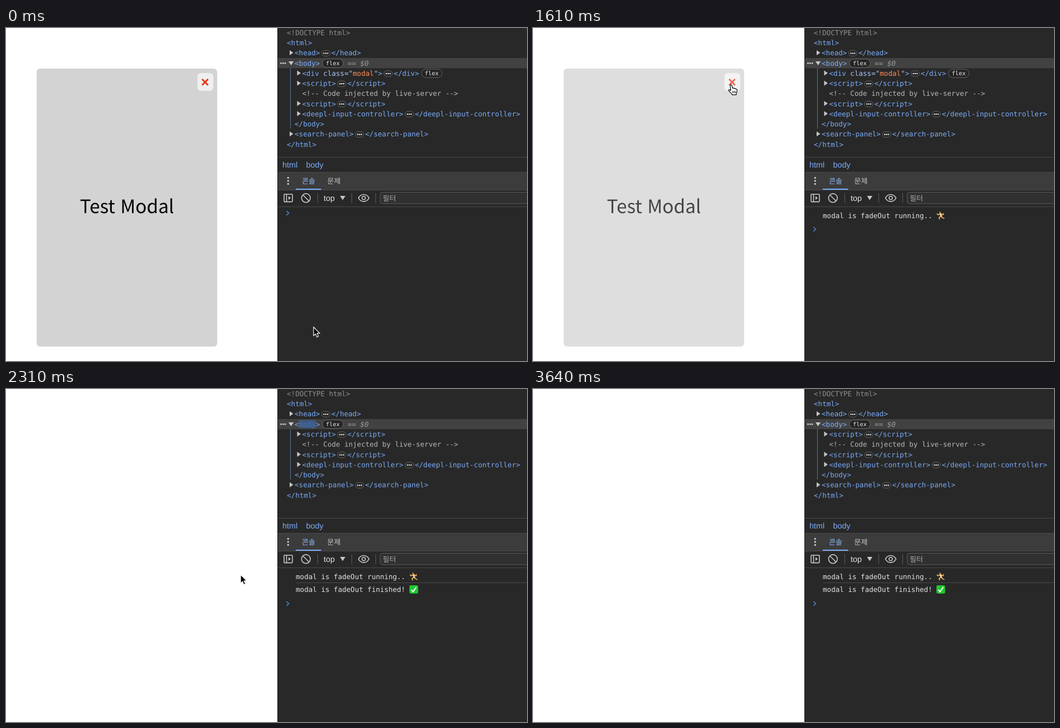
Animation, 935 px wide and 599 px high, one loop 4060 ms. Source, as an HTML page:

```html
<!DOCTYPE html>
<html lang="ko">
<head>
<meta charset="utf-8">
<title>Modal fade out</title>
<style>
  html, body { margin: 0; width: 100%; height: 100%; overflow: hidden; background: #fff; }
  svg { display: block; width: 935px; height: 599px; }
  text { white-space: pre; text-rendering: geometricPrecision; }
  .code text { font: 12.57px "DejaVu Sans Mono", monospace; fill: #7cacf8; }
  .ui { font: 14.4px "Liberation Sans", Arial, sans-serif; fill: #7cacf8; }
  .ko { font: 13px "Noto Sans CJK KR", "Noto Sans CJK", sans-serif; fill: #c7c7c7; }
  .title { font: 33.4px "Noto Sans CJK KR", "Noto Sans CJK", sans-serif; text-anchor: middle; }
  .code .badge { font-size: 10.3px; fill: #e8eaed; text-anchor: middle; }
  .code .attr { fill: #a8c7fa; }
  .code .value { fill: #fe8d59; }
  .code .note { fill: #b9b9b9; }
  .code .type { fill: #8f8f8f; }
  .code .ref { fill: #9a9a9a; font-style: italic; }
  .code .log { fill: #e3e3e3; }
  .line { stroke: #4a4a4a; }
  .icon { fill: none; stroke: #c7c7c7; stroke-width: 1.6; }

  .anim { animation: 4060ms step-end infinite; }
  #modal { animation-name: fade; }
  #cursor { animation-name: move; }
  #arrow { animation-name: arrow; }
  #hand { animation-name: hand; }
  #ring { animation-name: ring; }
  #running { animation-name: running; }
  #finished, #guideShort { animation-name: finished; }
  #divRow, #guideLong { animation-name: removed; }
  #after { animation-name: shift; }
  #prompt { animation-name: prompt; }
  #flash { animation-name: flash; }

  @keyframes fade {
    0% { opacity: 1; }
    36.2% { opacity: 1; animation-timing-function: ease; }
    54.67%, 100% { opacity: 0; }
  }
  @keyframes move {
    0% { transform: translate(551px, 537px); animation-timing-function: steps(2); }
    3.44% { transform: translate(532px, 506px); animation-timing-function: steps(3); }
    8.62% { transform: translate(445px, 352px); animation-timing-function: steps(3); }
    13.79% { transform: translate(387px, 240px); animation-timing-function: steps(2); }
    17.24% { transform: translate(352px, 167px); animation-timing-function: steps(2); }
    20.68% { transform: translate(347px, 122px); animation-timing-function: steps(2); }
    24.13%, 36.2% { transform: translate(346px, 95px); animation-timing-function: steps(5); }
    44.82% { transform: translate(356px, 110px); animation-timing-function: steps(3); }
    50% { transform: translate(384px, 200px); animation-timing-function: steps(2); }
    53.44% { transform: translate(408px, 286px); animation-timing-function: steps(2); }
    56.89% { transform: translate(420px, 333px); animation-timing-function: steps(3); }
    62.06% { transform: translate(429px, 412px); animation-timing-function: steps(2); }
    65.51%, 75.86% { transform: translate(431px, 434px); animation-timing-function: steps(8); }
    89.65%, 100% { transform: translate(462px, 610px); }
  }
  @keyframes arrow { 0%, 46.55%, 100% { opacity: 1; } 22.41% { opacity: 0; } }
  @keyframes hand { 0%, 46.55%, 100% { opacity: 0; } 22.41% { opacity: 1; } }
  @keyframes ring { 0%, 36.2%, 100% { opacity: 0; } 32.75% { opacity: 1; } }
  @keyframes running { 0% { opacity: 0; } 36.2%, 100% { opacity: 1; } }
  @keyframes finished { 0% { opacity: 0; } 55.17%, 100% { opacity: 1; } }
  @keyframes removed { 0% { opacity: 1; } 55.17%, 100% { opacity: 0; } }
  @keyframes shift { 0% { transform: none; } 55.17%, 100% { transform: translateY(-18.25px); } }
  @keyframes prompt {
    0% { transform: none; }
    36.2% { transform: translateY(29px); }
    55.17%, 100% { transform: translateY(53px); }
  }
  @keyframes flash {
    0% { opacity: 0; }
    55.17% { opacity: .95; animation-timing-function: linear; }
    58.62% { opacity: .7; animation-timing-function: ease-out; }
    65.51%, 100% { opacity: 0; }
  }
</style>
</head>
<body>
<svg viewBox="0 0 935 599">
  <g id="modal" class="anim">
    <rect x="55" y="73" width="324" height="500" rx="6" fill="#d3d3d3"/>
    <rect x="343.5" y="81" width="28.5" height="32" rx="6" fill="#efefef"/>
    <path d="M352 92l10.6 10.8m0-10.8L352 102.800" stroke="#e5330d" stroke-width="2.8"/>
    <text class="title" x="217" y="333">Test Modal</text>
  </g>

  <rect x="488" width="447" height="599" fill="#282828"/>
  <path d="M487.500 0V599" stroke="#1c1c1c"/>
  <rect x="488" y="54" width="447" height="18.300" fill="#424242"/>
  <path id="guideLong" class="anim" d="M510.500 72V181" stroke="#5b769f"/>
  <path id="guideShort" class="anim" d="M510.500 72V163" stroke="#5b769f"/>

  <g id="tree" class="code">
    <g id="divRow" class="anim"></g>
    <g id="after" class="anim"></g>
  </g>
  <g fill="#c7c7c7">
    <circle cx="493.500" cy="63.300" r="1.500"/>
    <circle cx="497.300" cy="63.300" r="1.500"/>
    <circle cx="501.100" cy="63.300" r="1.500"/>
    <path d="M507 60h9.200l-4.600 7z"/>
  </g>
  <rect id="flash" class="anim" x="525.500" y="56" width="30.500" height="14.500" rx="2" fill="#3d5f92"/>

  <path class="line" d="M488 232.500H935"/>
  <text class="ui" x="496" y="251">html</text>
  <text class="ui" x="538.500" y="251">body</text>

  <rect x="488" y="260" width="447" height="31" fill="#3c3c3c"/>
  <path class="line" d="M488 259.500H935M488 291.500H935M488 321.500H935"/>
  <g fill="#c7c7c7">
    <circle cx="506.300" cy="269.500" r="1.700"/>
    <circle cx="506.300" cy="275" r="1.700"/>
    <circle cx="506.300" cy="280.500" r="1.700"/>
  </g>
  <text class="ko" x="531" y="279.500" style="fill:#8fb8f8">콘솔</text>
  <text class="ko" x="576.500" y="279.500">문제</text>
  <rect x="520" y="289" width="45.500" height="2" fill="#7cacf8"/>

  <g class="icon">
    <rect x="499" y="299" width="15" height="13.600" rx="1"/>
    <path d="M503.500 299v13.600"/>
    <path d="M507 302.500l4 3.300-4 3.300z" fill="#c7c7c7" stroke="none"/>
    <circle cx="538.300" cy="305.800" r="7.900"/>
    <path d="M532.800 300.300l11 11"/>
    <path d="M632.500 305.800Q636 299.500 642 299.500T651.500 305.800Q648 312.100 642 312.100T632.500 305.800z"/>
    <circle cx="642" cy="305.800" r="3"/>
  </g>
  <path d="M559.500 297v18M620.500 297v18M663.500 297v18" stroke="#5a5a5a"/>
  <text class="ui" x="570" y="310.800" style="fill:#e3e3e3">top</text>
  <path d="M599.500 302h9.500l-4.750 7.500z" fill="#c7c7c7"/>
  <rect x="671.500" y="295.500" width="280" height="20.500" rx="4" fill="#303030" stroke="#5c5c5c"/>
  <text class="ko" x="676" y="310.500" style="fill:#a8a8a8">필터</text>

  <g id="running" class="anim code">
    <text class="log" x="520" y="341.500">modal is fadeOut running..</text>
    <g fill="none" stroke-linecap="round" stroke-linejoin="round" stroke-width="1.900">
      <path d="M732 339l-3 1.500.5 3M733 338.500l1.500 2.500 3 1.500M730 334.500l-3 1.500-1.500-1.500M732.500 334.500l3 1.500 1-2" stroke="#eeb04c"/>
      <path d="M731.300 334.300l1 3.700" stroke="#f3dfb4" stroke-width="3"/>
      <circle cx="730.300" cy="331.800" r="1.300" fill="#f0bd5e" stroke="#8a5a2c" stroke-width=".8"/>
    </g>
  </g>
  <g id="finished" class="anim code">
    <path class="line" d="M520 348.500H935"/>
    <text class="log" x="520" y="365">modal is fadeOut finished!</text>
    <rect x="724" y="353" width="15.600" height="15" rx="3" fill="#1fc52f"/>
    <path d="M727.500 361l3 3.800 5.800-8.600" fill="none" stroke="#fff" stroke-width="2"/>
  </g>
  <path id="prompt" class="anim" d="M503.200 329l4.300 4-4.300 4" fill="none" stroke="#5287d8" stroke-width="1.500"/>

  <g id="ring" class="anim" fill="none">
    <circle cx="346.500" cy="93" r="33.300" stroke="#fff" stroke-width="4"/>
    <circle cx="346.500" cy="93" r="33.300" stroke="#000" stroke-width="2"/>
  </g>
  <g id="cursor" class="anim">
    <path id="arrow" class="anim" d="M1 1V16.500L4.500 13.300L7 19L9.700 17.800L7.300 12.200H12z" stroke="#fff" stroke-width="1.200"/>
    <g id="hand" class="anim" fill="#fff" stroke="#000" stroke-width="1.200" stroke-linejoin="round">
      <path d="M4.800 11.500L3.900 3.200Q3.900 1.200 5.400 1.200T7.200 3L7.900 7.200Q9.600 6.200 10.800 7.800Q12.500 7 13.500 8.600Q15.900 8.200 16.300 10.600Q16.500 13 15 15.800L14.700 19.200H7.300L6.800 17.400Q3.600 14.800 1.100 11.700Q.6 9.500 2.800 10z"/>
      <path d="M8.600 12.200v3.800M10.900 12.200v3.800M13.200 12.200v3.800" fill="none" stroke-width="1"/>
    </g>
  </g>
</svg>
<script>
  const NS = "http://www.w3.org/2000/svg";
  const CHAR = 7.567;
  const [tree, divRow, after] = ["tree", "divRow", "after"].map(id => document.getElementById(id));
  const baseline = row => 12.8 + 18.25 * row;

  function add(parent, name, attrs, content = "") {
    const el = document.createElementNS(NS, name);
    for (const key in attrs) el.setAttribute(key, attrs[key]);
    el.textContent = content;
    parent.append(el);
    return el;
  }

  // Returns the x where the text ends.
  function write(parent, row, x, content, cls = "tag") {
    add(parent, "text", { x, y: baseline(row), class: cls }, content);
    return x + content.length * CHAR;
  }

  function pill(parent, cx, cy, w, h) {
    add(parent, "rect", { x: cx - w / 2, y: cy - h / 2, width: w, height: h, rx: h / 2,
      fill: "#242424", stroke: "#696969" });
  }

  function badge(parent, row, cx) {
    const y = baseline(row) - 4.2;
    pill(parent, cx, y, 37, 15);
    add(parent, "text", { x: cx, y: y + 3.7, class: "badge" }, "flex");
  }

  // Arrow, ellipsis and closing tag around an opening tag that ends at x = end.
  function fold(parent, row, x, end, name) {
    const y = baseline(row) - 4.2;
    add(parent, "path", { d: `M${x - 9} ${y - 5}l6.500 4.500-6.500 4.500z`, fill: "#c7c7c7" });
    pill(parent, end + 10.6, y + .4, 15, 10);
    for (const dx of [-3.3, 0, 3.3])
      add(parent, "circle", { cx: end + 10.6 + dx, cy: y + .4, r: 1.25, fill: "#e8eaed" });
    write(parent, row, end + 20.6, `</${name}>`);
  }

  function node(parent, row, x, name) {
    fold(parent, row, x, write(parent, row, x, `<${name}>`), name);
  }

  write(tree, 0, 504, "<!DOCTYPE html>", "type");
  write(tree, 1, 504, "<html>");
  node(tree, 2, 518, "head");
  write(tree, 3, 518, "<body>");
  badge(tree, 3, 586.5);
  write(tree, 3, 613, "== $0", "ref");

  let x = write(divRow, 4, 531.5, "<div ");
  x = write(divRow, 4, x, "class=\"", "attr");
  x = write(divRow, 4, x, "modal", "value");
  x = write(divRow, 4, x, "\"", "attr");
  x = write(divRow, 4, x, ">");
  fold(divRow, 4, 531.5, x, "div");
  badge(divRow, 4, 764);

  node(after, 5, 531.5, "script");
  write(after, 6, 531.5, "<!-- Code injected by live-server -->", "note");
  node(after, 7, 531.5, "script");
  node(after, 8, 531.5, "deepl-input-controller");
  write(after, 9, 518, "</body>");
  node(after, 10, 518, "search-panel");
  write(after, 11, 504, "</html>");
</script>
</body>
</html>
```
